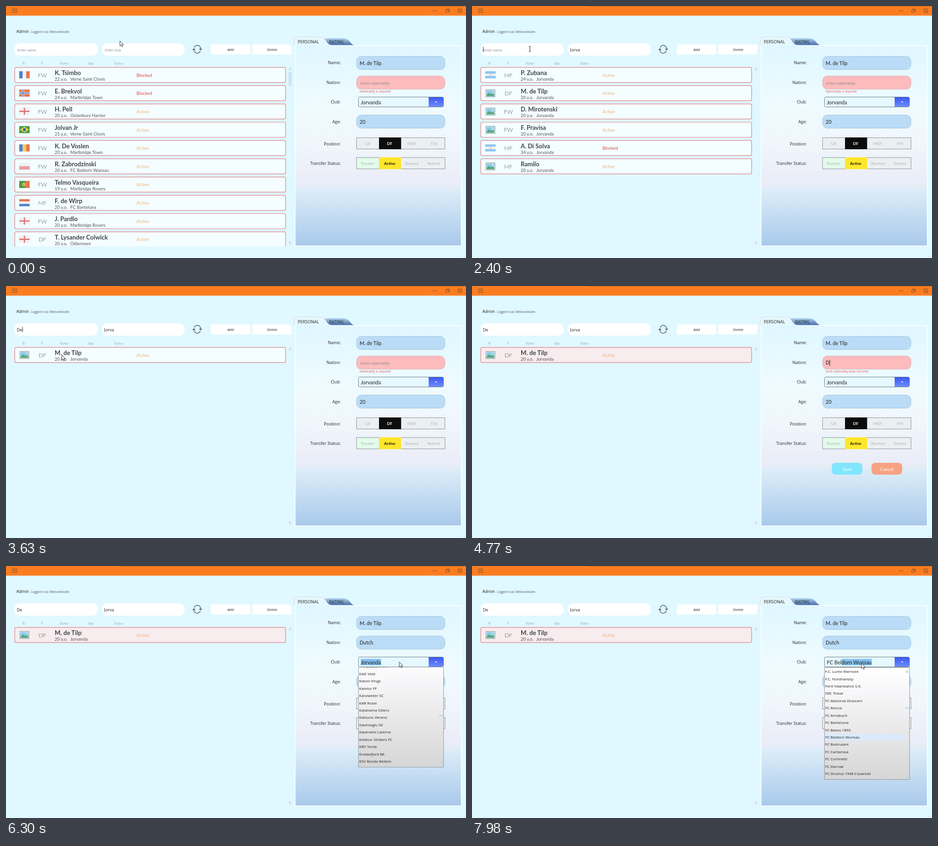
These frames come from a looping animation (973x533 px, 8000 ms). An HTML page:

```html
<!DOCTYPE html>
<html lang="en">
<head>
<meta charset="utf-8">
<title>Player admin</title>
<style>
  html, body { margin: 0; width: 100%; height: 100%; overflow: hidden; background: #e0f8ff; }
  svg { display: block; }
  text { font-family: "Open Sans", "Noto Sans", sans-serif; fill: #222; white-space: pre; }
  .d { font-family: Lato, sans-serif; }
  .sub { fill: #555; }
</style>
</head>
<body>
<svg id="stage" width="973" height="533" viewBox="0 0 973 533">
  <defs>
    <linearGradient id="panel" x2="0" y2="1">
      <stop offset="0" stop-color="#dff7ff"/><stop offset=".3" stop-color="#effbff"/>
      <stop offset=".5" stop-color="#f0f6fc"/><stop offset=".65" stop-color="#ebeef8"/>
      <stop offset=".71" stop-color="#e6ecf7"/><stop offset=".71" stop-color="#deeef8"/>
      <stop offset="1" stop-color="#a9c9ec"/>
    </linearGradient>
    <linearGradient id="tab" x2="0" y2="1">
      <stop offset="0" stop-color="#b4d6f2"/><stop offset="1" stop-color="#456aa6"/>
    </linearGradient>
    <linearGradient id="drop" x2="0" y2="1">
      <stop offset="0" stop-color="#3c58ee"/><stop offset="1" stop-color="#6c8cff"/>
    </linearGradient>
    <linearGradient id="menu" x2="0" y2="1">
      <stop offset="0" stop-color="#fff"/><stop offset=".2" stop-color="#f8f8fa"/>
      <stop offset="1" stop-color="#d6d6d6"/>
    </linearGradient>
    <clipPath id="listClip"><rect x="10" y="125" width="590" height="383.5"/></clipPath>
    <clipPath id="subClip"><rect x="100" y="0" width="300" height="30.2"/></clipPath>
    <clipPath id="menuClip"><rect x="744" y="214" width="183" height="245"/></clipPath>
  </defs>
</svg>
<script>
const LOOP = 8000;
const stage = document.getElementById('stage');
const $ = id => document.getElementById(id);

const rect = (x, y, w, h, fill, more = '') =>
  `<rect x="${x}" y="${y}" width="${w}" height="${h}" fill="${fill}" ${more}/>`;
const path = (d, more) => `<path d="${d}" ${more}/>`;
const line = (d, color, w = 1) => path(d, `fill="none" stroke="${color}" stroke-width="${w}"`);
const text = (x, y, s, size, more = '') =>
  `<text x="${x}" y="${y}" font-size="${size}" ${more}>${s}</text>`;
const group = (id, body) => `<g id="${id}">${body}</g>`;
const mid = 'text-anchor="middle"', end = 'text-anchor="end"', dosis = 'class="d"';

// Flags, 22 x 15
const RED = '#e8744e', BLUE = '#4f82cc', PALE = '#f0f1f3', SKY = '#8cc6f2';
const cols = c => c.map((f, i) => rect(i * 22 / c.length, 0, 22 / c.length, 15, f)).join('');
const bars = c => c.map((f, i) => rect(0, i * 15 / c.length, 22, 15 / c.length, f)).join('');
const dot = (x, y, r, f) => `<circle cx="${x}" cy="${y}" r="${r}" fill="${f}"/>`;
const flags = {
  fr: cols([BLUE, PALE, RED]),
  no: rect(0, 0, 22, 15, RED) + line('M8 0V15M0 7.5H22', PALE, 4) + line('M8 0V15M0 7.5H22', BLUE, 2),
  en: rect(0, 0, 22, 15, PALE) + line('M11 0V15M0 7.5H22', '#e07070', 2.6),
  br: rect(0, 0, 22, 15, '#4a9e52') + path('M2 7.5L11 1.5L20 7.5L11 13.5Z', 'fill="#f4da45"') + dot(11, 7.5, 3.2, '#3f62ac'),
  ro: cols([BLUE, '#f0d050', RED]),
  pl: bars([PALE, '#e8a0a4']),
  pt: cols(['#4a9850', RED]) + rect(9, 0, 3, 15, '#4a9850') + dot(9.5, 7.5, 3.4, '#ecd050') + dot(9.5, 7.5, 1.6, RED),
  nl: bars([RED, PALE, BLUE]),
  ar: bars([SKY, PALE, SKY]) + dot(11, 7.5, 1.5, '#e8c060'),
  pic: rect(1.5, .5, 19, 15, '#f4fafc', 'stroke="#7c8a94"') + rect(3, 2, 16, 12, '#7fccf4') +
    path('M3 14V11L8 7L12 10L15 8.5L19 11V14Z', 'fill="#55a878"') + dot(15.5, 5, 1.5, '#fff2b0')
};

const squad = [
  ['fr', 'FW', 'K. Tsimbo', 22, 'Verne Saint Clovis', 1],
  ['no', 'FW', 'E. Brekvol', 24, 'Marlbridge Town', 1],
  ['en', 'FW', 'H. Pell', 20, 'Ostenbury Harrier'],
  ['br', 'FW', 'Jolvan Jr', 21, 'Verne Saint Clovis'],
  ['ro', 'FW', 'K. De Voslen', 20, 'Marlbridge Town'],
  ['pl', 'FW', 'R. Zabrodzinski', 20, 'FC Beldorn Wunsau'],
  ['pt', 'FW', 'Telmo Vasqueira', 19, 'Marlbridge Rovers'],
  ['nl', 'MF', 'F. de Wirp', 20, 'FC Banteluna'],
  ['en', 'FW', 'J. Pardlo', 20, 'Marlbridge Rovers'],
  ['en', 'DF', 'T. Lysander Colwick', 20, 'Oldermere']
];
const club = 'Jorvanda';
const clubSquad = [
  ['ar', 'MF', 'P. Zubana', 24, club],
  ['pic', 'DF', 'M. de Tilp', 20, club],
  ['pic', 'FW', 'D. Mirotenski', 20, club],
  ['pic', 'FW', 'F. Pravisa', 20, club],
  ['ar', 'MF', 'A. Di Solva', 34, club, 1],
  ['pic', 'MF', 'Ramilo', 20, club]
];

const row = ([flag, pos, name, age, team, blocked], i) =>
  `<g transform="translate(0 ${129 + i * 38.65})">` +
  rect(18.5, .8, 573, 32, '#f4fdff', 'rx="3" stroke="#df8585" stroke-width="1.2" class="card"') +
  `<g transform="translate(28 9)">${flags[flag]}</g>` +
  text(77, 21.5, pos, 12, `${mid} class="d" font-weight="300" style="fill:#555"`) +
  text(103, 17, name, 12.9, `${dosis} font-weight="700" style="fill:#41464b"`) +
  `<g clip-path="url(#subClip)">${text(103, 29.2, age + ' y.o.', 9.3, 'class="d sub"')}${text(136, 29.2, team, 9.3, 'class="d sub"')}</g>` +
  text(276, 20.6, blocked ? 'Blocked' : 'Active', 9.4, `${dosis} style="fill:${blocked ? '#e0484c' : '#f0b277'}"`) +
  '</g>';
const list = (id, rows) => group(id, rows.map(row).join(''));

function chrome() {
  const heads = [['N', 37], ['P', 76], ['Name', 123], ['Age', 180], ['Status', 238]];
  const ink = '#7a4a28';
  return rect(0, 0, 973, 20.4, '#fc7d20') + rect(243, 0, 730, .8, '#a8682e') +
    line('M12 6.5H24M12 10H24M12 13.5H24', ink, 1.1) +
    [904, 907.3, 910.6].map(x => dot(x, 10, .9, ink)).join('') +
    line('M930 8.5H936V13.5H930ZM932 8V6.5H938V11.5H936', ink, .9) +
    line('M956 6H964V13.5H956ZM958 8L962 12M962 8L958 12', ink, .9) +
    text(22, 57, 'Admin', 8.7) + text(53, 56.5, 'Logged in as: Melovanikutes', 6.2, 'class="sub"') +
    rect(18, 79, 176, 26, '#fff', 'rx="11"') + rect(203, 79, 175, 26, '#fff', 'rx="11"') +
    line('M398 88A7 7 0 0 1 411.4 92.6M411 95A7 7 0 0 1 397.6 90.6', '#3c444a', 1.2) +
    line('M408.8 90.4L411.4 93L414 90.2M395 93L397.6 90.4L400.2 92.8', '#3c444a', 1.2) +
    rect(433, 81, 84, 21.5, '#fff', 'rx="4"') + rect(521, 81, 83, 21.5, '#fff', 'rx="4"') +
    text(475, 95, 'Add', 8, mid + ' font-style="italic"') + text(563, 95, 'Delete', 8, mid + ' font-style="italic"') +
    heads.map(([s, x]) => text(x, 124, s, 7.3, mid + ' class="d" font-style="italic" style="fill:#a4b0b8"')).join('') +
    path('M597 136H605L601 128.5ZM597 498.5H605L601 506Z', 'fill="#cbe3ee"') +
    [[970, 527], [970, 530], [967, 530]].map(([x, y]) => rect(x, y, 1.3, 1.3, '#b8ccd4')).join('');
}

function segments(y, names, on, fill, ink) {
  const w = 46.75, x = i => 741.5 + i * w;
  const labels = names.map((s, i) => text(x(i) + w / 2, y + 15.6, s, 8.3,
    `${mid} class="d" font-weight="${i === on ? 700 : 400}" style="fill:${i === on ? ink : '#b0b5b9'}"`));
  return rect(x(0), y, 4 * w, 24, '#ebeff2') +
    (names[0] === 'Transfer' ? rect(x(0), y, w, 24, '#e2fbea') : '') +
    rect(x(0), y, 4 * w, 24, 'none', 'stroke="#858b90" stroke-width=".9"') +
    rect(x(on) + .75, y - .5, w, 25, fill) + labels.join('');
}

function panel() {
  const labels = [['Name:', 122.5], ['Nation:', 164.5], ['Club:', 205.5], ['Age:', 247.5], ['Position:', 294.5], ['Transfer Status:', 335.5]];
  const field = (y, id) => rect(741.5, y, 187, 28, '#bbdcf7', `rx="10" stroke="#a5c6da" stroke-width=".9" id="${id}"`);
  return path('M672 83V71Q674 68 682 68H712Q721 68 726 74Q731 81 736 83Z', 'fill="url(#tab)"') +
    rect(611.5, 83.5, 351.5, 424, 'url(#panel)', 'stroke="#fff" stroke-width="1.6"') +
    path('M611 84.5V70Q611 67 615 67H662Q671 67 676 74Q681 82 687 84.5Z', 'fill="#e4f8ff"') +
    line('M611 84V70Q611 67 615 67H662Q671 67 676 74Q681 82 687 83.5', '#fff', 1.4) +
    line('M610 83V69Q610.5 66 614 66H663Q671 66.4 675 71', '#bccad2', .8) +
    text(617, 79, 'PERSONAL', 9) + text(683.5, 79, 'RATING', 8.8) +
    labels.map(([s, y]) => text(708, y, s, 8.9, end)).join('') +
    field(106.5, 'nameBox') + field(148, 'nationBox') + field(230.5, 'ageBox') +
    text(748, 125, 'M. de Tilp', 10.6, dosis) + text(748, 248.5, '20', 10.6, dosis) +
    rect(745.5, 192.5, 180, 21, '#e6f8ff', 'rx="3" stroke="#63727e" stroke-width=".9"') +
    path('M894 193H922.5Q925 193 925 195.5V210.5Q925 213 922.5 213H894Z', 'fill="url(#drop)"') +
    path('M907.3 202.2H912.5L909.9 204.8Z', 'fill="#fff"') +
    segments(278.5, ['GK', 'DF', 'MDF', 'FW'], 1, '#0c0c0c', '#fff') +
    segments(320.5, ['Transfer', 'Active', 'Blocked', 'Retired'], 1, '#ffe62a', '#111') +
    group('buttons',
      rect(761, 374, 65, 25, '#80e6fe', 'rx="8"') + rect(845, 374, 65, 25, '#f7a283', 'rx="8"') +
      text(793.5, 390.5, 'Save', 9.7, mid + ' class="d" style="fill:#fff"') +
      text(877.5, 390.5, 'Cancel', 9.7, mid + ' class="d" style="fill:#fff"'));
}

const clubsJ = [club, 'K Muidekerk VA', 'KAD Veld', 'Kalvor Kings', 'Kamlor FF', 'Kanzweiler SC', 'KAR Rosel',
  'Katahama Otters', 'Katsuno Verano', 'Kavimoglu SK', 'Kazenami Laterna', 'Kelanur Strikers FC', 'KRV Tomb',
  'Kroldefjord BK', 'KSV Ronde Bellem'];
const clubsF = ['F.C. Lunte Warnsee', 'F.C. Nordhavsby', 'Ferit Yalanbahce S.K.', 'FBC Tolvar', 'FC Abelonia Dravceni',
  'FC Alvoca', 'FC Arnsbuch', 'FC Banteluna', 'FC Bavos 1893', 'FC Beldorn Wunsau', 'FC Bodruseni', 'FC Cantarosa',
  'FC Corrinetti', 'FC Darrow', 'FC Drumul 1948 Cozaresti'];
const ROW = 15.42;
const options = (id, names) => group(id, names.map((s, i) => text(747, 226.2 + i * ROW, s, 8)).join(''));

const menu = () => `<g clip-path="url(#menuClip)">` + group('menuBox',
  rect(745.5, 214.5, 180, 237, 'url(#menu)', 'stroke="#8b9094" stroke-width=".9"') +
  rect(746, 216, 167.5, 14, '#dbeafc', 'id="hot"') + options('optJ', clubsJ) + options('optF', clubsF) +
  path('M916.5 225.5H923.5L920 219ZM916.5 441.5H923.5L920 448Z', 'fill="#c3d6e2"') +
  rect(916, 299, 8, 2.5, '#bdd8ea', 'id="thumb"')) + '</g>';

stage.insertAdjacentHTML('beforeend',
  chrome() +
  `<g clip-path="url(#listClip)">${list('all', squad)}${list('byClub', clubSquad)}${list('byName', [clubSquad[1]])}</g>` +
  rect(597.5, 139, 7, 30, '#c9e6f6', 'id="scroll"') + panel() +
  text(0, 95.5, '', 9, 'id="nameText"') + text(0, 95.5, '', 9, 'id="clubText"') +
  text(748, 166, '', 10.6, 'id="nationText"') + text(748, 183, '', 6.4, 'id="error" style="fill:#e25058"') +
  rect(750, 196.5, 0, 13.5, '#84c0f0', 'id="mark"') + text(750.5, 207.5, '', 10.8, `id="combo" ${dosis}`) +
  rect(0, 0, 1, 11, '#222', 'id="caret"') + menu() +
  group('arrow', path('M0 0V10.6L2.5 8.4L4.2 12.3L6 11.5L4.3 7.7H7.5Z', 'fill="#fff" stroke="#222" stroke-width=".9"')) +
  group('beam', line('M-2 -5.5H-.5L0 -5L.5 -5.5H2M0 -5V5M-2 5.5H-.5L0 5L.5 5.5H2', '#222', 1)));

// Timelines: [start, value]
const nameSteps = [[0, ''], [2700, 'D'], [2970, 'De']];
const clubSteps = [[0, ''], [1320, 'J'], [1365, 'Jo'], [1410, 'Jor'], [1455, 'Jorv'], [1500, 'Jorva']];
const nationSteps = [[0, ''], [4560, 'D'], [4890, 'Du'], [5010, 'Dut'], [5130, 'Dutc'], [5250, 'Dutch']];
// [start, club index, letters typed]
const comboSteps = [[6600, 0, 1], [6840, 4, 2], [7080, 4, 3], [7290, 7, 4], [7680, 7, 5], [7860, 9, 6]];
const listSteps = [[0, 'all'], [1350, 'byClub'], [2850, 'byName']];
const focusSteps = [[0, ''], [1290, 'club'], [2385, 'name'], [3900, ''], [4290, 'nation'], [6150, 'combo']];
const moves = [[60, 241, 74], [690, 314, 141], [1140, 314, 141], [1280, 250, 91], [1800, 250, 91], [2340, 122.5, 91],
  [3180, 122.5, 91], [3600, 118, 146], [3990, 118, 146], [4290, 792, 162], [5340, 792, 162], [5550, 818, 186],
  [5760, 818, 186], [6120, 832, 203], [6570, 832, 203], [6900, 824, 206]];
const hidden = [[1320, 1800], [2670, 3180], [4530, 5340]];
const boxes = [[18, 79, 194, 105], [203, 79, 378, 105], [741, 148, 929, 176]];
const MENU_AT = 6180, MENU_MS = 136;

const at = (steps, t) => steps.filter(s => s[0] <= t).pop();
const show = (id, on) => { $(id).style.display = on ? '' : 'none'; };
const set = (id, attrs) => { for (const k in attrs) $(id).setAttribute(k, attrs[k]); };
const clamp = v => Math.min(1, Math.max(0, v));

function pointer(t) {
  const i = moves.findIndex(m => m[0] > t);
  if (i < 0) return moves[moves.length - 1].slice(1);
  if (!i) return moves[0].slice(1);
  const [a, b] = [moves[i - 1], moves[i]];
  const u = (t - a[0]) / (b[0] - a[0]), k = u * u * (3 - 2 * u);
  return [a[1] + (b[1] - a[1]) * k, a[2] + (b[2] - a[2]) * k];
}

function entry(id, x, value, hint, size, hintSize) {
  set(id, { x: value ? x : x + 1.5, 'font-size': value ? size : hintSize });
  $(id).style.fill = value ? '#222' : '#7d858b';
  $(id).textContent = value || hint;
}

function draw(t) {
  const [, current] = at(listSteps, t);
  ['all', 'byClub', 'byName'].forEach(id => show(id, id === current));
  show('scroll', current === 'all');
  $('byName').querySelector('.card').setAttribute('fill', t >= 3900 ? '#f7ecee' : '#f4fdff');

  const [nameAt, name] = at(nameSteps, t), [clubAt, team] = at(clubSteps, t), [nationAt, nation] = at(nationSteps, t);
  entry('nameText', 23, name, 'Enter name', 8.7, 7.3);
  entry('clubText', 207.5, team, 'Enter club', 9, 7.3);
  entry('nationText', 748, nation, 'Enter nationality', 10.6, 8);
  $('nationText').setAttribute('class', nation ? 'd' : '');
  const valid = nation === 'Dutch';
  set('nationBox', { fill: valid ? '#bbdcf7' : '#fdbbbc', stroke: valid ? '#a5c6da' : '#d0b4c0' });
  $('error').textContent = valid ? '' : nation ? 'Such nationality does not exist' : 'Nationality is required';
  $('buttons').style.opacity = clamp((t - 4560) / 150);

  const [focusAt, focus] = at(focusSteps, t);
  const input = { name: ['nameText', 23.3, 86.5, name, nameAt], club: ['clubText', 207.5, 86.5, team, clubAt],
    nation: ['nationText', 748.3, 156, nation, nationAt] }[focus];
  if (input) {
    const [id, x, y, value, typedAt] = input;
    set('caret', { x: x + (value ? $(id).getComputedTextLength() : 0), y, height: focus === 'nation' ? 13 : 11 });
    show('caret', (t - Math.max(focusAt, typedAt)) % 600 < 300);
  } else show('caret', false);

  const step = at(comboSteps, t);
  const label = step ? clubsF[step[1]] : club, typed = step ? step[2] : 0;
  const combo = $('combo');
  combo.textContent = label;
  const from = typed ? combo.getSubStringLength(0, typed) : 0;
  set('mark', { x: 750.5 + from, width: focus === 'combo' ? combo.getComputedTextLength() - from : 0 });

  const open = clamp((t - MENU_AT) / MENU_MS);
  show('menuBox', open > 0);
  set('menuBox', { transform: `translate(0 ${(open - 1) * 237})` });
  show('optJ', !step);
  show('optF', step);
  set('hot', { y: 216.4 + (step ? step[1] : 0) * ROW });
  set('thumb', { y: step ? 299 : 341 });

  const [x, y] = pointer(t);
  const away = hidden.some(([a, b]) => t >= a && t < b);
  const beam = boxes.some(b => x > b[0] && y > b[1] && x < b[2] && y < b[3]);
  show('arrow', !away && !beam);
  show('beam', !away && beam);
  set(beam ? 'beam' : 'arrow', { transform: `translate(${x} ${y})` });
}

const start = performance.now();
function tick() {
  draw((performance.now() - start) % LOOP);
  requestAnimationFrame(tick);
}
tick();
</script>
</body>
</html>
```
